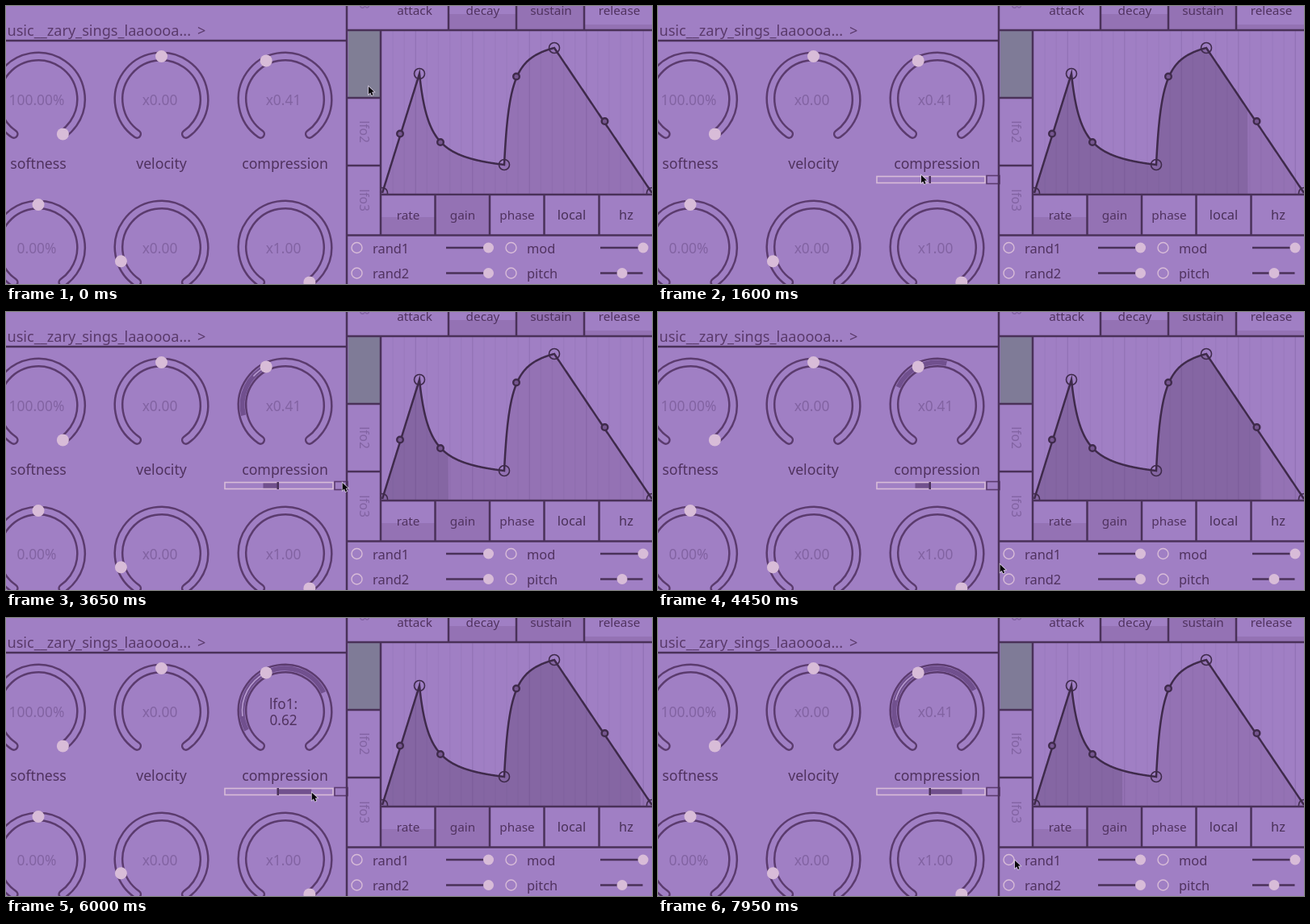
These frames come from a looping animation (800 px wide and 345 px high, 8000 ms). An HTML page with a canvas:

```html
<!DOCTYPE html>
<html lang="en">
<head>
<meta charset="utf-8">
<title>LFO modulation</title>
<style>
  html, body { margin: 0; width: 100%; height: 100%; overflow: hidden; background: #a07fc4; }
  canvas { display: block; }
</style>
</head>
<body>
<canvas id="stage" width="800" height="345"></canvas>
<script>
const ctx = document.getElementById('stage').getContext('2d');
const LOOP = 8000, STEP = 50;
const C = {
  bg: '#a07fc4', line: '#4a3159', ring: '#5b3b6e', text: '#50325f', dim: '#8263a2',
  light: '#d8bcd8', fill: '#9472b4', swept: '#8566a3', curve: '#3f2a4b', band: '#71508e', tab: '#7f7b97'
};

// Time, x, y of the pointer tip
const POINTER = [
  [0, 449, 100], [450, 428, 188], [600, 426, 192], [900, 400, 250], [1350, 328, 211], [1600, 326, 210],
  [1700, 336, 214], [2200, 319, 215], [3000, 319, 215], [3550, 416, 212], [3700, 417, 212],
  [3950, 420, 256], [4400, 424, 315], [4850, 420, 300], [5200, 416, 232], [5400, 337, 215],
  [5650, 373, 216], [6200, 382, 217], [6600, 377, 217], [6900, 377, 217], [7350, 396, 230], [7900, 442, 301]
];
// Time and accumulated cycles of the LFO
const CYCLES = [[600, .06], [1600, .79], [2500, 1.405], [3650, 2.247], [5200, 3.39], [6700, 4.45], [8000, 5.363]];
const LFO_START = 600, ASSIGNED = 1100, BIPOLAR = 3700;
const DRAGS = [[1700, 3000], [5400, 6850]];

const PLOT = { x: 465, y: 31, w: 336, bottom: 233 };
const NODES = [[466, 232], [512, 84], [617, 197], [679, 52], [800, 232]];
const HANDLES = [[488, 158.5], [538, 169], [632, 87.5], [741.5, 143]];
const BEND = [1, 9, 9, 1];

function sample(keys, t, column) {
  let i = 1;
  while (i < keys.length - 1 && keys[i][0] < t) i++;
  const a = keys[i - 1], b = keys[i];
  const u = Math.min(1, Math.max(0, (t - a[0]) / (b[0] - a[0])));
  return a[column] + (b[column] - a[column]) * u;
}

function curveY(x) {
  let i = 0;
  while (i < 3 && x > NODES[i + 1][0]) i++;
  const [x0, y0] = NODES[i], [x1, y1] = NODES[i + 1];
  const u = Math.min(1, Math.max(0, (x - x0) / (x1 - x0)));
  return y0 + (y1 - y0) * BEND[i] * u / (1 + (BEND[i] - 1) * u);
}

function text(str, x, y, size, color = C.text, align = 'center') {
  ctx.font = `${size}px "Noto Sans", sans-serif`;
  ctx.fillStyle = color;
  ctx.textAlign = align;
  ctx.fillText(str, x, y);
}

function rect(x, y, w, h, color) {
  ctx.fillStyle = color;
  ctx.fillRect(x, y, w, h);
}

function line(x0, y0, x1, y1, color = C.line, width = 2.5) {
  ctx.strokeStyle = color;
  ctx.lineWidth = width;
  ctx.beginPath();
  ctx.moveTo(x0, y0);
  ctx.lineTo(x1, y1);
  ctx.stroke();
}

function dot(x, y, r, color = C.light) {
  ctx.fillStyle = color;
  ctx.beginPath();
  ctx.arc(x, y, r, 0, 7);
  ctx.fill();
}

function circle(x, y, r, color, width) {
  ctx.strokeStyle = color;
  ctx.lineWidth = width;
  ctx.beginPath();
  ctx.arc(x, y, r, 0, 7);
  ctx.stroke();
}

const knobAngle = v => (125 + 290 * v) * Math.PI / 180;

function knobArc(x, y, from, to, width, color, cap = 'butt') {
  ctx.strokeStyle = color;
  ctx.lineWidth = width;
  ctx.lineCap = cap;
  ctx.beginPath();
  ctx.arc(x, y, 53, knobAngle(Math.min(from, to)), knobAngle(Math.max(from, to)));
  ctx.stroke();
  ctx.lineCap = 'butt';
}

function knob(x, y, value, caption, label, mod) {
  knobArc(x, y, 0, 1, 12, C.ring, 'round');
  knobArc(x, y, 0, 1, 7, C.bg, 'round');
  if (mod) {
    knobArc(x, y, mod.from, mod.to, 6, C.band);
    knobArc(x, y, value, mod.now, 1.6, '#b99dd2');
  }
  const a = knobAngle(value);
  dot(x + 53 * Math.cos(a), y + 53 * Math.sin(a), 7.5);
  if (mod && mod.dragging) {
    text('lfo1:', x - 2, y - 3, 17.2);
    text(mod.amount.toFixed(2).replace('-', '−'), x - 2, y + 17, 17.2);
  } else {
    text(caption, x - 2, y + 7, 17.4, C.dim);
  }
  text(label, x, y + 86, 17.7);
}

function leftPanel(mod) {
  ctx.save();
  ctx.beginPath();
  ctx.rect(0, 0, 422, 345);
  ctx.clip();
  text('music__zary_sings_laaoooa...', 229, 37, 18.1, '#5a3a6b', 'right');
  text('>', 237, 37, 18.1, '#5a3a6b', 'left');
  line(0, 43, 422, 43);
  knob(40, 115.5, 1, '100.00%', 'softness');
  knob(192.5, 115.5, .5, 'x0.00', 'velocity');
  knob(345.5, 115.5, .41, 'x0.41', 'compression', mod);
  knob(40, 299.5, .5, '0.00%', '');
  knob(192.5, 299.5, .124, 'x0.00', '');
  knob(345.5, 299.5, 1, 'x1.00', '');
  ctx.restore();
}

function depthSlider(amount) {
  const end = 336.5 + amount * 67;
  rect(Math.min(end, 336.5), 212, Math.abs(end - 336.5), 7, C.band);
  ctx.lineWidth = 1.6;
  ctx.strokeStyle = C.light;
  ctx.strokeRect(271, 211.5, 134, 8);
  rect(335.5, 211, 2.5, 9, C.line);
  ctx.strokeStyle = C.ring;
  ctx.strokeRect(407, 210.5, 16, 10);
}

function sideText(str, y, align) {
  ctx.save();
  ctx.translate(438, y);
  ctx.rotate(Math.PI / 2);
  text(str, 0, 0, 15.6, C.dim, align);
  ctx.restore();
}

function traceCurve(until) {
  ctx.beginPath();
  ctx.moveTo(466, curveY(466));
  for (let x = 466; x < until; x += .5) ctx.lineTo(x, curveY(x));
  for (const [x, y] of NODES) if (x === until) ctx.lineTo(x, y);
}

function fillCurve(until, color) {
  traceCurve(until);
  ctx.lineTo(until, PLOT.bottom);
  ctx.lineTo(466, PLOT.bottom);
  ctx.fillStyle = color;
  ctx.fill();
}

function plot(sweepX) {
  ctx.save();
  ctx.beginPath();
  ctx.rect(PLOT.x, PLOT.y, PLOT.w, PLOT.bottom - PLOT.y);
  ctx.clip();
  fillCurve(800, C.fill);
  if (sweepX) fillCurve(sweepX, C.swept);
  for (let k = 1; k < 24; k++) {
    const x = PLOT.x + 14.1 * k;
    line(x, PLOT.y, x, PLOT.bottom, `rgba(75,45,105,${k % 5 === 3 ? .17 : .06})`, 1.2);
  }
  traceCurve(800);
  ctx.strokeStyle = C.curve;
  ctx.lineWidth = 2.5;
  ctx.stroke();
  NODES.forEach(([x, y]) => circle(x, y, 6.5, C.curve, 1.6));
  HANDLES.forEach(([x, y]) => {
    dot(x, y, 4, '#765690');
    circle(x, y, 3.8, C.curve, 2.4);
  });
  ctx.restore();
}

function rightPanel(hoverTab, sweepX) {
  rect(424, 31, 40, 82, hoverTab ? '#807e95' : C.tab);
  sideText('env3', 4, 'right');
  sideText('lfo2', 156, 'center');
  sideText('lfo3', 241, 'center');

  rect(549, 10, 83, 19, C.fill);
  rect(633, 0, 83, 29, C.fill);
  rect(717, 23, 83, 6, C.fill);
  ['attack', 'decay', 'sustain', 'release'].forEach((name, i) => text(name, 506 + 84.5 * i, 11, 15.3));

  plot(sweepX);

  rect(465, 262, 66, 21, C.fill);
  rect(532, 236, 67, 47, C.fill);
  ['rate', 'gain', 'phase', 'local', 'hz'].forEach((name, i) =>
    text(name, 498 + 67.5 * i, 265, i < 3 ? 15.3 : 16.4, i < 3 ? C.text : C.line));

  [548, 632, 716].forEach(x => line(x, 0, x, 30));
  [531.5, 599, 666.5, 734.5].forEach(x => line(x, 234, x, 284));
  line(422, 30, 800, 30);
  line(464, 234, 800, 234);
  line(422, 284.5, 800, 284.5);
  line(422, 114, 464, 114);
  line(422, 198, 464, 198);
  line(464, 30, 464, 284);
  line(422, 0, 422, 345);

  control('rand1', 434.5, 300, 597.5);
  control('rand2', 434.5, 331.5, 597.5);
  control('mod', 625.5, 300, 789);
  control('pitch', 625.5, 331.5, 763);
}

function control(name, x, y, knobX) {
  circle(x, y, 6.5, C.light, 1.4);
  text(name, x + 19.5, y + 6.5, 16.4, C.text, 'left');
  line(x + 110.5, y, x + 163, y);
  dot(knobX, y, 6.5);
}

function pointer(x, y) {
  const shape = [[0, 0], [0, 9.5], [2.2, 7.5], [3.8, 11], [5.6, 10.2], [4, 6.8], [7, 6.6]];
  ctx.beginPath();
  shape.forEach(([dx, dy]) => ctx.lineTo(x + dx, y + dy));
  ctx.closePath();
  ctx.strokeStyle = '#d9cfe2';
  ctx.lineWidth = 1.5;
  ctx.stroke();
  ctx.fillStyle = '#08060a';
  ctx.fill();
}

// Depth follows the pointer while dragging and keeps its last value afterwards.
function depthAt(t) {
  let depth = 0;
  for (const [press, release] of DRAGS)
    if (t >= press) depth = (sample(POINTER, Math.min(t, release), 1) - 337) / 67;
  return depth;
}

function draw(t) {
  const x = sample(POINTER, t, 1), y = sample(POINTER, t, 2);
  const sweepX = t >= LFO_START ? PLOT.x + PLOT.w * (sample(CYCLES, t, 1) % 1) : 0;
  const amount = depthAt(t);
  let mod = null;
  if (t >= DRAGS[0][0]) {
    const level = (PLOT.bottom - curveY(sweepX)) / 203;
    const at = v => .41 + amount * (t >= BIPOLAR ? v - .5 : v);
    mod = {
      amount, from: at(0), to: at(1), now: at(level),
      dragging: DRAGS.some(([press, release]) => t >= press && t < release)
    };
  }
  rect(0, 0, 800, 345, C.bg);
  leftPanel(mod);
  if (t >= ASSIGNED) depthSlider(amount);
  rightPanel(y < 114, sweepX);
  pointer(x, y);
}

function tick() {
  const t = performance.now() % LOOP;
  draw(Math.floor(t / STEP) * STEP);
  requestAnimationFrame(tick);
}
tick();
</script>
</body>
</html>
```
